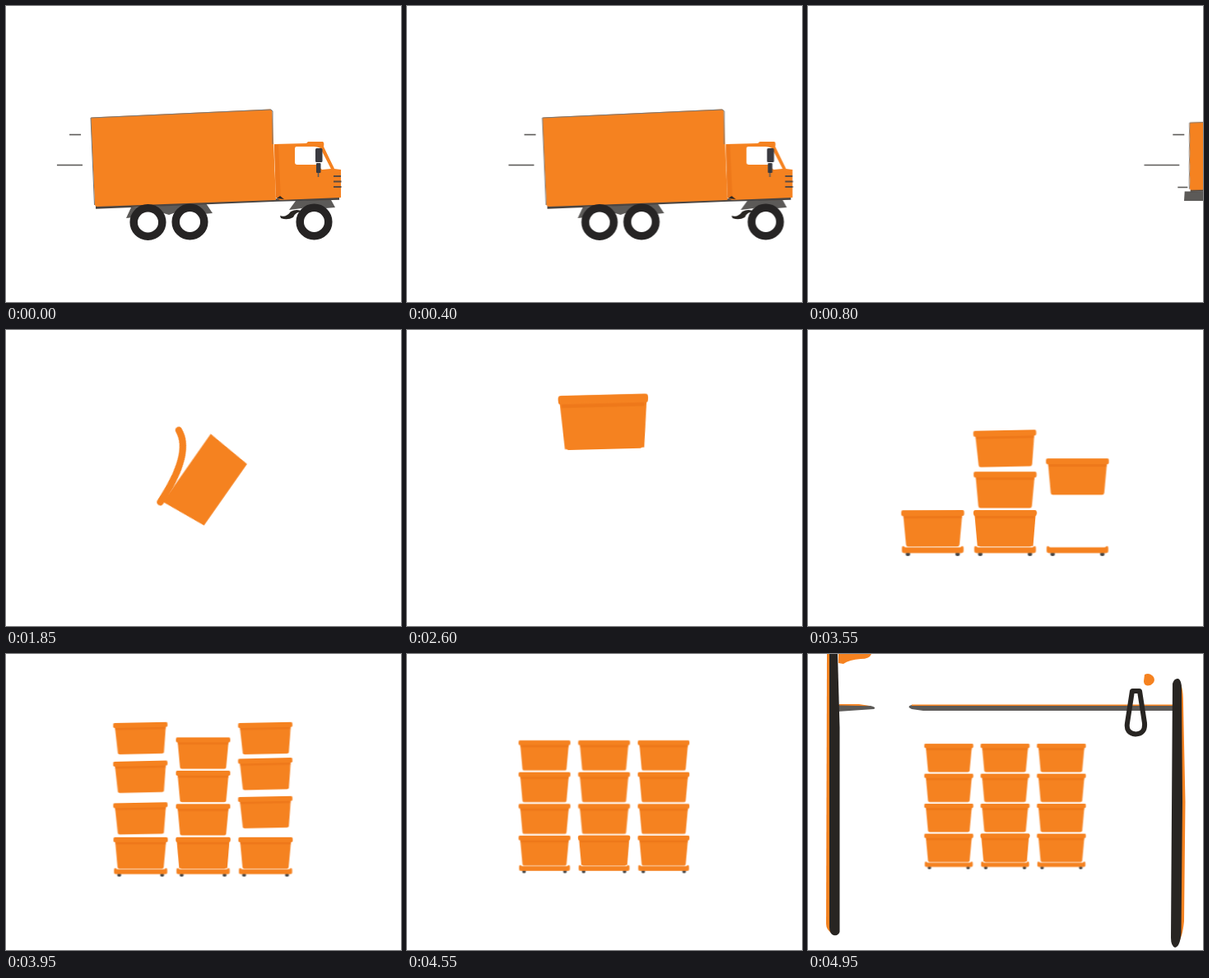
Write an HTML page that moves like this. It is 480 px wide and 360 px high and loops after 5 s.

```html
<!DOCTYPE html>
<html lang="en">
<head>
<meta charset="utf-8">
<title>Moving crates</title>
<style>
  :root { --orange: #f58220; --shade: #ee781a; --ink: #282522; --gray: #5c5a58; }
  html, body { margin: 0; width: 100%; height: 100%; overflow: hidden; background: #fff; }
  svg { display: block; width: 100vw; height: 100vh; }
  .o { fill: var(--orange); }
  .s { fill: var(--shade); }
  .k { fill: var(--ink); }
  .g { fill: var(--gray); }
  .line { fill: none; stroke: var(--gray); stroke-width: 1.6; }
  .wheel { fill: #fff; stroke: #262424; stroke-width: 9.5; }
  .a { animation: 5s linear infinite; }

  /* truck */
  #drive { animation-name: drive; }
  @keyframes drive {
    0% { transform: none; visibility: visible; animation-timing-function: cubic-bezier(.5, 0, .75, .5); }
    12% { transform: translateX(150px); animation-timing-function: cubic-bezier(.35, .25, .7, .65); }
    16% { transform: translateX(357px); }
    19.9% { transform: translateX(610px); visibility: visible; }
    20%, 100% { transform: translateX(620px); visibility: hidden; }
  }
  #truck { animation-name: squash; }
  @keyframes squash {
    0%, 11% { transform: translate(0, 0) skewX(0deg) scaleY(1); }
    16%, 100% { transform: translate(8.5px, 38.6px) skewX(-3.4deg) scaleY(.76); }
  }
  #tail, #wind3 { animation-name: late; }
  @keyframes late { 0%, 12% { opacity: 0; } 15%, 100% { opacity: 1; } }
  #wind1 { animation-name: wind1; }
  @keyframes wind1 { 0% { transform: none; } 16%, 100% { transform: translateX(8px); } }
  #wind2 { animation-name: wind2; transform-origin: 93px 0; }
  @keyframes wind2 { 0%, 8% { transform: none; } 3%, 13%, 100% { transform: scaleX(1.38); } }

  /* camera on the stacks; its origin is the floor */
  #camera { animation-name: camera; }
  @keyframes camera {
    0%, 58% { transform: translate(239.5px, 292px) scale(1); }
    59.2% { transform: translate(239.5px, 299px) scale(1); }
    62%, 66% { transform: translate(239.5px, 292px) scale(1); }
    69% { transform: translate(239.5px, 282px) scale(.84); }
    70% { transform: translate(239.5px, 276px) scale(.79); }
    74% { transform: translate(239.5px, 272px) scale(.69); }
    79%, 84% { transform: translate(239.5px, 271px) scale(.66); }
    99%, 100% { transform: translate(239.5px, 262px) scale(.595); }
  }

  /* first crate */
  #hero { animation-name: hero; }
  @keyframes hero {
    0%, 26.9% { visibility: hidden; transform: translate(0, -112px) rotate(-150deg) scale(9); }
    27% { visibility: visible; transform: translate(0, -112px) rotate(-150deg) scale(9); }
    31% { transform: translate(1px, -111px) rotate(-102deg) scale(3.2); }
    34% { transform: translate(2px, -110px) rotate(-75deg) scale(1.4); }
    37% { transform: translate(3.5px, -108px) rotate(-55deg) scale(1.03); animation-timing-function: ease-in-out; }
    42% { transform: translate(-1px, -165px) rotate(6deg) scale(1.06); animation-timing-function: ease-in-out; }
    46% { transform: translate(-1px, -176px) rotate(-3deg) scale(1.1); animation-timing-function: ease-in-out; }
    52% { transform: translate(-.5px, -180px) rotate(-1.5deg) scale(1.09, 1.14); }
    54% { transform: translate(0, -183px) rotate(0deg) scale(1.07, 1.14); animation-timing-function: cubic-bezier(.33, 0, .67, .33); }
    58% { transform: translate(0, -45px) rotate(0deg) scale(1, 1.05); }
    59.2% { transform: translate(0, -39.7px) rotate(0deg) scale(1.2, .85); }
    61% { transform: translate(0, -46px) rotate(1deg) scale(.97, 1.04); }
    63% { transform: translate(0, -44px) rotate(0deg) scale(1); }
    65% { transform: translate(0, -45px) rotate(-1.2deg) scale(1); }
    68%, 100% { transform: translate(0, -44px) rotate(0deg) scale(1); visibility: visible; }
  }
  #lid { animation-name: lid; fill: none; stroke: var(--orange); stroke-width: 8; stroke-linecap: round; }
  @keyframes lid {
    0%, 30% { d: path("M-47 -25C-20 -25 20 -25 47 -25"); }
    37% { d: path("M-51 -30C-20 -31 20 -36 31 -61"); animation-timing-function: ease-in-out; }
    41% { d: path("M-47 -25C-20 -25 20 -23 46 -29"); }
    43%, 100% { d: path("M-46 -25C-20 -25 20 -25 46 -25"); }
  }
  #lip { animation-name: lip; }
  @keyframes lip { 0%, 41% { opacity: 0; } 43%, 100% { opacity: 1; } }

  /* stacks */
  #stacks { animation-name: stacks; }
  @keyframes stacks { 0%, 57.9% { opacity: 0; } 58%, 100% { opacity: 1; } }
  .drop { animation-name: drop; animation-delay: calc(var(--t) * 1ms - 5000ms); }
  @keyframes drop {
    0% { transform: translateY(-450px) rotate(0deg); animation-timing-function: cubic-bezier(.33, 0, .67, .33); }
    4% { transform: translateY(0) rotate(0deg); animation-timing-function: ease-out; }
    6.5% { transform: translateY(calc(var(--b) * -1px)) rotate(-1.3deg); animation-timing-function: ease-in; }
    9.5%, 40% { transform: translateY(0) rotate(0deg); }
    40.1%, 100% { transform: translateY(-450px) rotate(0deg); }
  }
  .mid { animation-name: mid; }
  @keyframes mid {
    0%, 57.9% { visibility: hidden; transform: scale(.3, 1); }
    58% { visibility: visible; transform: scale(.3, 1); }
    59.4% { transform: scale(1.35, .9); }
    61.5%, 100% { visibility: visible; transform: none; }
  }
  .side { animation-name: side; }
  @keyframes side {
    0%, 66.9% { visibility: hidden; transform: scale(.1, 1); }
    67% { visibility: visible; transform: scale(.1, 1); }
    69%, 100% { visibility: visible; transform: none; }
  }

  /* doorway */
  #door { animation-name: door; }
  @keyframes door { 0%, 92.9% { visibility: hidden; } 93%, 100% { visibility: visible; } }
  #left { animation-name: left; transform-origin: 30px 0; }
  @keyframes left {
    0%, 93% { transform: translateX(-17px) scaleY(.15); }
    97% { transform: translateX(-4px) scaleY(1); }
    99%, 100% { transform: none; }
  }
  #right { animation-name: right; transform-origin: 450px 356px; }
  @keyframes right {
    0%, 93% { transform: translateX(17px) scaleY(.15); }
    97% { transform: translateX(4px) scaleY(.9); }
    99%, 100% { transform: none; }
  }
  .rail { animation-name: rail; }
  @keyframes rail { 0%, 94% { transform: scaleX(0); } 99%, 100% { transform: none; } }
  .pop { animation-name: pop; }
  @keyframes pop { 0%, 96% { transform: scale(0); } 99%, 100% { transform: none; } }
</style>
</head>
<body>
<svg viewBox="0 0 480 360">
  <defs>
    <g id="crate">
      <path class="o" d="M-47 -23H47L42.5 26Q42 29 39 29H-39Q-42 29 -42.5 26Z"/>
      <path class="s" d="M-46.5 -21H46.5L46 -16H-46Z"/>
      <rect class="o" x="-50" y="-29" width="100" height="9" rx="2.5"/>
    </g>
    <g id="dolly">
      <circle cx="-39.5" cy="-3.5" r="3.5" fill="#444"/>
      <circle cx="39.5" cy="-3.5" r="3.5" fill="#444"/>
      <path class="o" d="M-47 -16Q-45 -16 -44 -14H44Q45 -16 47 -16Q49 -16 49 -13V-8Q49 -5 46 -5H-46Q-49 -5 -49 -8V-13Q-49 -16 -47 -16Z"/>
    </g>
  </defs>

  <g id="drive" class="a">
    <path id="wind1" class="a line" d="M77 156.5H91"/>
    <path id="wind2" class="a line" d="M62 193.5H93"/>
    <path id="wind3" class="a line" d="M91 220.5H103"/>
    <g id="truck" class="a">
      <rect id="tail" class="a g" x="102" y="246" width="40" height="15"/>
      <path class="g" d="M152 245L243 240L251 252L240 253L223 245L198 254L172 246L155 257L146 258Z"/>
      <path class="g" d="M352 237L394 234L400 245L388 246Q374 237 360 246L344 248Z"/>
      <path class="k" d="M333 255Q340 258 346 250Q354 246 360 250Q352 250 349 257Q342 261 334 258Z"/>
      <path d="M109 245L330 236L405 234" fill="none" stroke="#4a4542" stroke-width="3.5"/>
      <path class="o" d="M103 137Q103 135.5 105 135.5L321 125.5Q323 125.5 323.5 128L328 236L111 244Q108 244 108 241Z"/>
      <path d="M107.5 242L103 136L322 126L324 128V168" fill="none" stroke="#777" stroke-width="1"/>
      <path class="o" d="M326 168L365 167L367 165H385Q387 166 386 171L399 198L407 199V233L333 236L328 233Z"/>
      <path class="s" d="M326 169H331L334 234L328 233Z"/>
      <path class="k" d="M329 234L333 231L338 235Z"/>
      <path fill="#fff" d="M353 171H374Q383 171 385 177L395 198L384 199L377 193L354 193Q351 193 351 190V174Q351 171 353 171Z"/>
      <path d="M385 175L397 198" fill="none" stroke="#f58220" stroke-width="3.5"/>
      <rect fill="#3a3a40" x="376" y="173" width="8.5" height="17" rx="1.5"/>
      <rect fill="#3a3a40" x="377" y="191" width="5.5" height="12" rx="1"/>
      <path class="line" d="M379.5 203V208"/>
      <path d="M398 207H407M398 213.5H407.5M398 220H407.5" fill="none" stroke="#5c4a40" stroke-width="2"/>
      <circle class="wheel" cx="172.5" cy="263" r="17.3"/>
      <circle class="wheel" cx="223.5" cy="262.5" r="17.3"/>
      <circle class="wheel" cx="374.5" cy="262.5" r="17.3"/>
    </g>
  </g>

  <g id="camera" class="a">
    <g id="stacks" class="a"></g>
    <g id="hero" class="a">
      <path class="o" d="M-49 -27.5L49 -27.5L44.5 28H-44Z"/>
      <g id="lip" class="a"><use href="#crate"/></g>
      <path id="lid" class="a" d="M-46 -25C-20 -25 20 -25 46 -25"/>
    </g>
  </g>

  <g id="door" class="a">
    <g class="a rail" style="transform-origin: 36px 65px">
      <path class="g" d="M36 61.5L76 63Q84 65 80 67L36 70Z"/>
      <path class="o" d="M38 61H62L76 63.2L38 62.5Z"/>
    </g>
    <g class="a rail" style="transform-origin: 443px 65px">
      <path class="g" d="M443 62H126Q119 64 126 67L140 69H443Z"/>
      <path class="o" d="M126 61.5H443V63H126Z"/>
    </g>
    <g id="left" class="a">
      <path class="o" d="M23 0H30V340Q22 336 22 328Z"/>
      <path class="k" d="M26 0H36L38.5 90V338Q37 343 31 342Q26 340 26 332Z"/>
    </g>
    <g id="right" class="a">
      <path class="o" d="M450 34Q456 36 456 60L458.5 180L457 325Q455 345 450 350Z"/>
      <path class="k" d="M443 36Q445 29 450 30Q454 32 454 42L455 180L453.5 340Q452 356 446 357Q441 355 441 345Z"/>
    </g>
    <path class="a pop" style="transform-origin: 398px 65px" d="M394 45H403L409 84Q410 97 398 97.5Q386 96 388 84Z"
      fill="none" stroke="#282522" stroke-width="6" stroke-linejoin="round"/>
    <path class="a pop o" style="transform-origin: 414px 31px" d="M409 25Q415 22 420 28Q423 34 416 38Q408 40 408 33Z"/>
    <path class="a pop o" style="transform-origin: 37px 0" d="M37 0H77Q75 6 64 6Q50 7 43 12L37 11Z"/>
  </g>
</svg>
<script>
  const NS = 'http://www.w3.org/2000/svg';
  const add = (parent, tag, attrs) => {
    const el = document.createElementNS(NS, tag);
    for (const k in attrs) el.setAttribute(k, attrs[k]);
    return parent.appendChild(el);
  };
  const stacks = document.getElementById('stacks');

  // start times and rebound heights, bottom crate first; the middle base is the hero crate
  const columns = [
    { x: -115, t: [3340, 3560, 3610, 3640], b: [0, 3, 18, 28] },
    { x: 0, t: [null, 3070, 3260, 3420], b: [0, 4, 5, 6] },
    { x: 115, t: [3370, 3590, 3620, 3650], b: [2, 15, 23, 29] }
  ];
  for (const { x, t, b } of columns) {
    const col = add(stacks, 'g', { transform: `translate(${x} 0)` });
    add(col, 'use', { href: '#dolly', class: x ? 'a side' : 'a mid' });
    t.forEach((start, i) => {
      if (start === null) return;
      const slot = add(col, 'g', { transform: `translate(0 ${-44 - 61.3 * i})` });
      add(slot, 'use', { href: '#crate', class: 'a drop', style: `--t:${start};--b:${b[i]}` });
    });
  }
</script>
</body>
</html>
```
